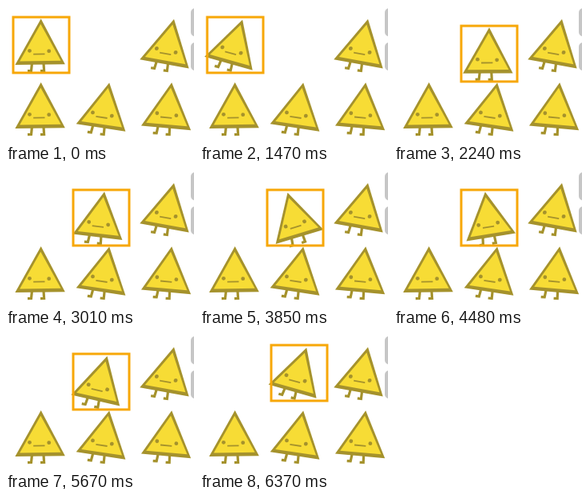
An HTML page that plays this animation: 235x171 px, repeating every 7.14 s.

```html
<!DOCTYPE html>
<html lang="en">
<head>
<meta charset="utf-8">
<title>Swinging triangle</title>
<style>
  html, body { margin: 0; width: 100%; height: 100%; overflow: hidden; background: #fff; }
  svg { display: block; width: 235px; height: 171px; }
  .dark { fill: #a5922c; }
  .skin { fill: #f7dc35; }
  .line { fill: none; stroke: #a5922c; }
  .frame { fill: none; stroke: #f7a708; stroke-width: 3; }
  .button { fill: #c6c6c6; }
</style>
</head>
<body>
<svg viewBox="0 0 235 171">
  <defs>
    <g id="buddy">
      <path class="line" stroke-width="3.2" d="M-11.5 23L-12.5 32.4L-17 32.6M3 23L3.6 32.4L-1 32.6"/>
      <path class="dark" d="M-.3-33L29.8 24.2L-32.6 25Z"/>
      <path class="skin" d="M-.7-26.2L24.6 19.8L-26.8 20.6Z"/>
      <circle class="dark" cx="-14.5" cy="7.3" r="2.4"/>
      <circle class="dark" cx="9.7" cy="7.7" r="2.4"/>
      <path class="line" stroke-width="1.8" d="M-9.8 11.6L4.5 11.4"/>
    </g>
  </defs>
  <rect class="button" x="231" y="3" width="30" height="35" rx="5"/>
  <rect class="button" x="231" y="46" width="30" height="35" rx="5"/>
  <use href="#buddy" transform="translate(204 49) rotate(11)"/>
  <use href="#buddy" transform="translate(44 129)"/>
  <use href="#buddy" transform="translate(124 129) rotate(9.5)"/>
  <use href="#buddy" transform="translate(204 129) rotate(6)"/>
  <g id="card">
    <use id="swing" href="#buddy"/>
    <rect class="frame" x="-35" y="-35" width="70" height="70"/>
  </g>
</svg>
<script>
  const LOOP = 7140, STEP = 70;
  const SPIN_START = 1400, SPIN_END = 6370;
  const TILT = 18, HALF_SWINGS = 8.5, SLOWDOWN = 1278;
  const card = document.getElementById('card');
  const swing = document.getElementById('swing');

  const clamp = (v, lo, hi) => Math.min(hi, Math.max(lo, v));

  function glide(t, from, to) {
    const p = clamp((t - from) / (to - from), 0, 1);
    return (1 - Math.cos(Math.PI * p)) / 2;
  }

  // A swing whose phase runs down almost exponentially
  function angleAt(t) {
    const u = clamp(t, SPIN_START, SPIN_END) - SPIN_START;
    const left = HALF_SWINGS * Math.exp(-Math.pow(u / SLOWDOWN, 1.07));
    return TILT * Math.cos(Math.PI * left);
  }

  function draw(now) {
    const t = Math.floor((now % LOOP) / STEP) * STEP;
    const away = glide(t, 1470, 1890), drop = glide(t, 6230, 6370);
    const x = 44 + 75 * away + 5 * drop;
    const y = 49 + 11 * (away - drop);
    card.setAttribute('transform', `translate(${x} ${y})`);
    swing.setAttribute('transform', `rotate(${angleAt(t)})`);
  }

  const start = performance.now();
  function tick() {
    draw(performance.now() - start);
    requestAnimationFrame(tick);
  }
  tick();
</script>
</body>
</html>
```
